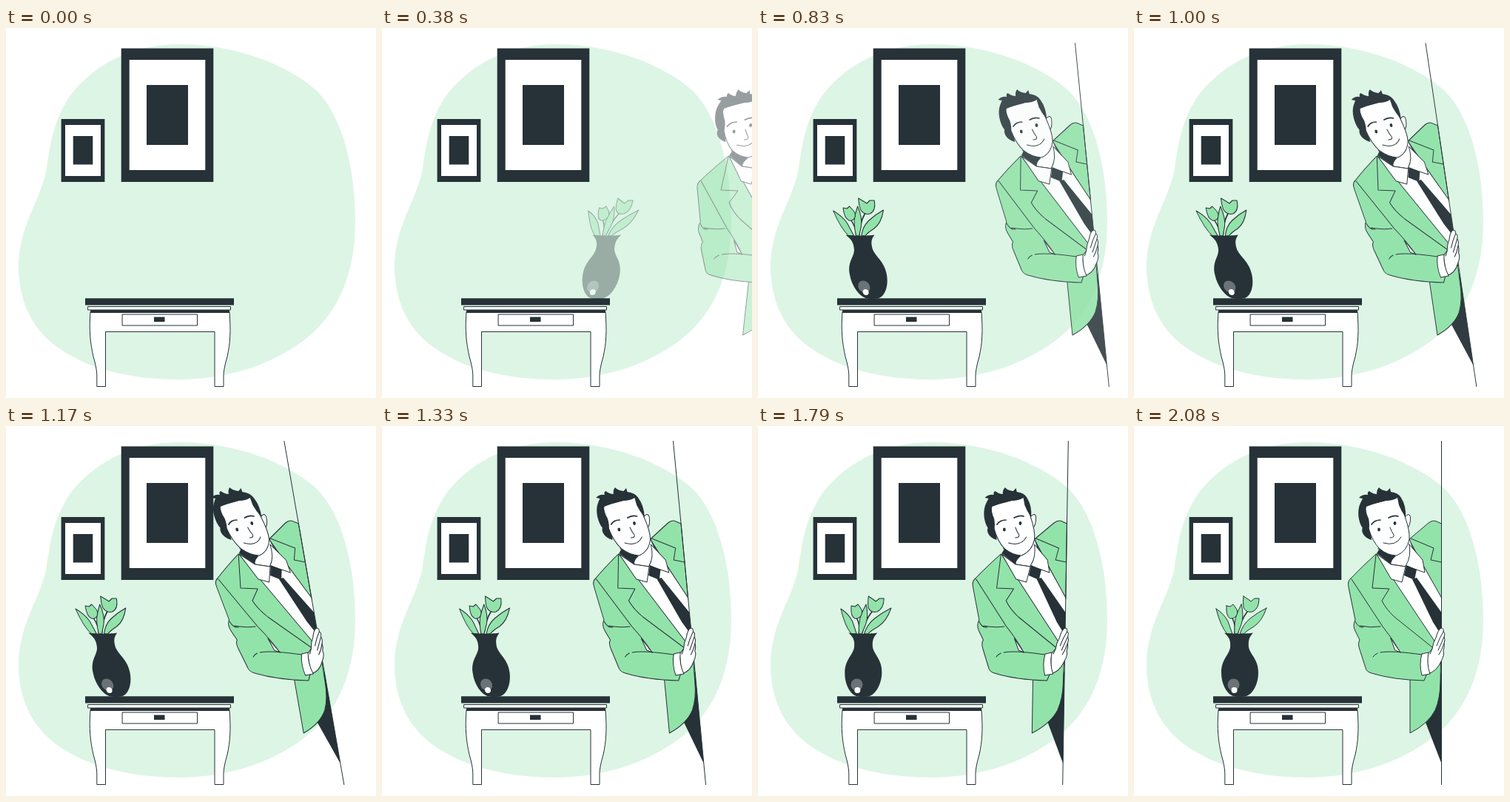
An HTML page that plays this animation: 500 by 500 pixels, repeating every 2.12 s.

```html
<!DOCTYPE html>
<html>
<head>
<meta charset="utf-8">
<style>
html, body { margin: 0; width: 100%; height: 100%; overflow: hidden; background: #fff; }
svg { display: block; width: 100vw; height: 100vh; }
.ink { fill: #263238; stroke: none; }
.mint { fill: #92e3a9; }
.white { fill: #fff; }
.line { fill: none; }
.plain { stroke: none; }
.art { stroke: #263238; stroke-width: 1; stroke-linejoin: round; stroke-linecap: round; }
</style>
</head>
<body>
<svg viewBox="0 0 500 500">
  <path fill="#ddf5e5" d="M235 22C310 22 382 50 420 85C455 120 472 190 472 262C472 330 450 385 405 420C360 455 300 475 232 475C165 475 105 459 65 428C32 402 17 365 17 322C17 270 45 235 54 195C60 160 62 125 90 87C125 45 175 22 235 22Z"/>

  <!-- pictures -->
  <path class="ink" d="M155.700 27.500H280.300V208H155.700ZM74.600 123H133.400V208H74.600Z"/>
  <path class="white" d="M166.700 43H269.300V192H166.700ZM80 131H128V200H80Z"/>
  <path class="ink" d="M190 77H246V158H190ZM90.700 146H117.300V184.500H90.700Z"/>

  <!-- table -->
  <g class="art">
    <path class="white" d="M114 384C112 410 114 426 118 444Q123 461 122.800 470V484.500H134.500V410.500H282V484.500H294V470Q294 461 299 444C303 426 304 410 302 384Z"/>
    <path class="white" d="M111 376.500H303.500V381H111Z"/>
    <path class="white" d="M157.500 387H258.500V402H157.500Z"/>
    <path class="ink" d="M107 365.300H308V374.500H107ZM114 381H302V385H114ZM200 390.500H214.500V397H200Z"/>
  </g>

  <g id="vase" class="art">
    <path class="line" stroke-width="1.600" d="M136 281Q138 270 133 260M140 281Q144 263 153 251"/>
    <path class="mint" d="M111 247Q122 254 127 264L133 281H126Q117 271 111 247Z"/>
    <path class="mint" d="M179 246Q173 264 162 271Q153 276 148 281H143Q147 268 157 260Q167 252 179 246Z"/>
    <path class="mint" d="M145 241Q149 256 145 268L140 281H136Q135 264 139 254Q142 247 145 241Z"/>
    <path class="mint" d="M125 243L130 244L134 241L137 245Q142 251 138 257Q135 261 130 260Q124 257 125 243Z"/>
    <path class="mint" d="M148 230L154 234L158 237L163 233L169 233Q169 247 160 251Q151 253 148 245Q147 238 148 230Z"/>
    <path class="ink" d="M122 279.500C131 281 153 281 161 279.500C156 285 154 289 155 299C157 309 168 315 168 333C168 350 160 362 152 365Q143 367 134 365C126 362 118 350 118 333C118 315 129 309 130 299C131 289 128 285 122 279.500Z"/>
    <circle class="plain" cx="134.500" cy="349.500" r="8" fill="#6b7377"/>
    <circle class="plain white" cx="135.500" cy="357" r="4"/>
  </g>

  <g id="man" class="art">
    <path class="ink" d="M393 398L415.500 456V330Z"/>
    <path class="mint" d="M373 335V415Q398 402 407 384Q414 368 414 345L415 290L380 300Z"/>
    <!-- far shoulder and shirt -->
    <path class="mint" d="M372 153L398 131Q404 126.500 409 129L415.500 132V234Z"/>
    <path class="line" d="M374 152L405 165L401 181L415.500 184"/>
    <path class="white plain" d="M329 174L372 156L415.500 232V292L408 304Z"/>
    <path class="line" d="M376 162L415.500 232"/>
    <path class="ink" d="M376 207L382 205L415.500 252V283L404 265Z"/>
    <!-- near side of the jacket -->
    <path class="mint" d="M327 173Q308 190 293 206Q288 210 290 218L299 262Q295 269 299 277L305 289Q302 294 305 302L313 327Q314 332 321 334Q350 343 392 344L408 305L411 298L329 175Z"/>
    <path class="line" d="M327 174L322 219L345 220L335 236Q340 247 352 258L408 303M294 207L336 271Q350 288 360 306"/>
    <path class="white" d="M347 287L360 306L353 303Z"/>
    <path class="line" d="M299 264Q303 273 310 272M305 270Q320 273 333 271M323 312Q325 309 329 307M333 306Q348 303 389 309"/>
    <path class="line" d="M415.500 20.500V484.500"/>
    <!-- hand -->
    <path class="white" d="M397 308L403 301Q404 293 408 286Q411 275 415 273Q419 273 418 278Q421 279 419 285Q421 288 419 294Q420 298 418 304Q420 309 415 318Q409 332 397 335Z"/>
    <path class="line" d="M418 278Q413 286 409 297M419 285Q415 294 411 303M419 294Q416 303 412 309M403 301L400 308"/>
    <path class="white" d="M389 308L398 306Q395 321 400 335L389 337Q385 322 389 308Z"/>
    <!-- neck, collar and tie knot -->
    <path class="white" d="M330 165L372 152L382 180L367 190L348 187Z"/>
    <path class="ink" d="M328 172L333 164L354 176Q348 180 347 187Z"/>
    <path class="white" d="M328 173L347 187L367 190L362 211L348 207Z"/>
    <path class="white" d="M372 160L390 181L393 198L367 189Q375 177 372 160Z"/>
    <path class="ink" d="M368 188L382 194L379 208L365 202Z"/>
    <!-- head -->
    <path class="ink" d="M309 137C306 143 311 151 321 154L320 138Z"/>
    <path class="white" d="M366 123Q372 116 373.500 123Q374 134 369 139Z"/>
    <path class="white" d="M312 108L357 96L366 122Q373 142 372 153Q369 169 355 175Q343 175 332 166Q322 156 317 138Z"/>
    <path class="ink" d="M317 141L309 138C303 130 301 114 306 104L309 98L304 97Q309 92 316 93Q315 89 318 88Q323 92 328 92Q328 86 331 83Q334 87 342 88L346 84L347 89Q357 90 361 97Q368 108 367 123Q361 115 358 107L356 97Q350 101 340 101Q326 104 314 109Q312 115 317 125Q319 134 317 141Z"/>
    <path class="line" stroke-width="1.700" d="M321 133Q325 127 333 127M344 124Q351 120 357 122"/>
    <ellipse class="ink" cx="331" cy="140" rx="1.900" ry="2.400"/>
    <ellipse class="ink" cx="352.500" cy="131.500" rx="1.900" ry="2.400"/>
    <path class="line" d="M346 137Q348 143 351 147Q352 151 346 151M337 158Q354 163 361 150"/>
  </g>
</svg>
<script>
const LOOP = 2120, LEAD = 15, PACE = 0.967;
const STOPS = [0, 1200, 1600, 2000];
const SHEAR = [-20, 10, -2, 0].map(deg => Math.tan(deg * Math.PI / 180));
const SHIFT = [250, 0, 0, 0];
const ALPHA = [0, 1, 1, 1];

function bezier(x1, y1, x2, y2) {
  const at = (a, b, s) => 3 * a * s * (1 - s) ** 2 + 3 * b * s * s * (1 - s) + s ** 3;
  return x => {
    let lo = 0, hi = 1;
    for (let i = 0; i < 30; i++) {
      const mid = (lo + hi) / 2;
      if (at(x1, x2, mid) < x) lo = mid; else hi = mid;
    }
    return at(y1, y2, lo);
  };
}

const actors = [
  { id: 'vase', pivot: 297.5, ease: bezier(0.36, -0.01, 0.5, 1.38) },
  { id: 'man', pivot: 252.5, ease: bezier(0, 0, 0.58, 1) }
];

function pose({ id, pivot, ease }, time) {
  const i = time < STOPS[1] ? 0 : time < STOPS[2] ? 1 : 2;
  const x = Math.min(1, (time - STOPS[i]) / (STOPS[i + 1] - STOPS[i]));
  const p = x <= 0 ? 0 : x >= 1 ? 1 : ease(x);
  const mix = list => list[i] + (list[i + 1] - list[i]) * p;
  const k = mix(SHEAR);
  const node = document.getElementById(id);
  node.setAttribute('transform', `matrix(1 0 ${k} 1 ${mix(SHIFT) - k * pivot} 0)`);
  node.setAttribute('opacity', Math.max(0, Math.min(1, mix(ALPHA))));
}

const start = performance.now();
function draw() {
  const t = (performance.now() - start) % LOOP;
  // a short empty hold before the entrance
  const time = t < 80 ? 0 : LEAD + t * PACE;
  actors.forEach(actor => pose(actor, time));
  requestAnimationFrame(draw);
}
draw();
</script>
</body>
</html>
```
